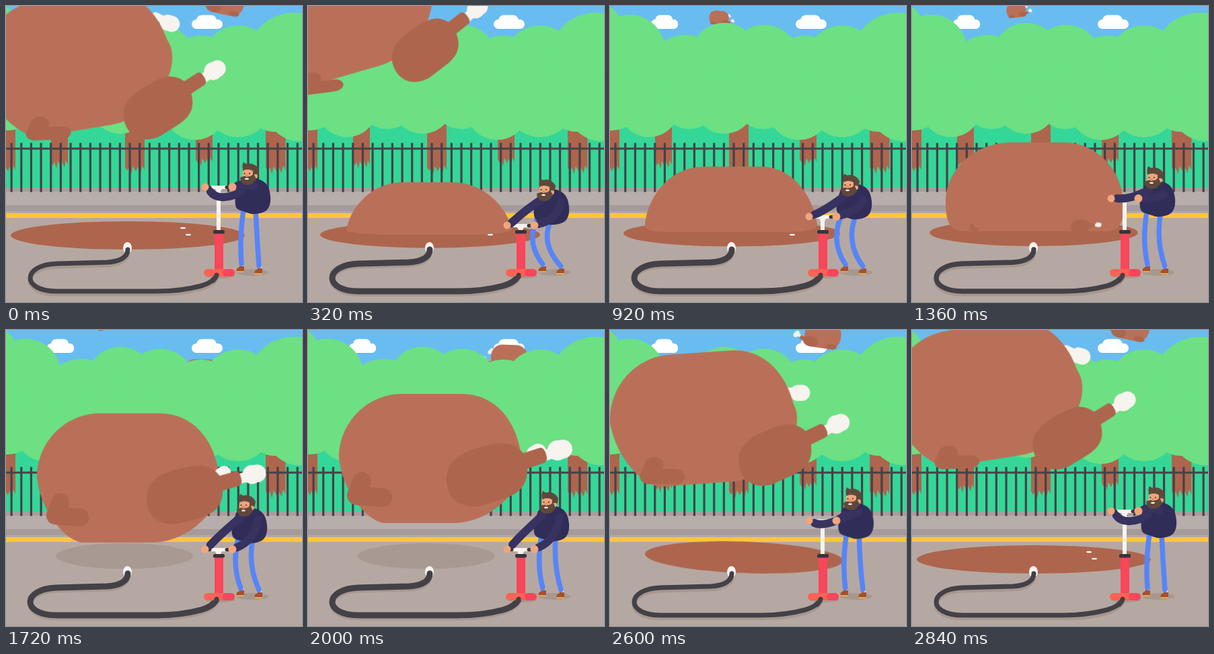
These frames come from a looping animation (440 by 440 pixels, 2.88 s). An HTML page without scripts:

```html
<!DOCTYPE html>
<html lang="en">
<head>
<meta charset="utf-8">
<title>Pumping up</title>
<style>
html, body { margin: 0; width: 100%; height: 100%; overflow: hidden; }
svg { display: block; width: 100vw; height: 100vh; background: #69bcf0; }
.a { animation: 2880ms linear infinite; }
.e { animation-timing-function: ease-in-out; }
.meat { fill: #ba7058; }
.dark { fill: #ae654d; }
.white { fill: #f7f3ef; }
.line { fill: none; stroke-linecap: round; stroke-linejoin: round; }

/* pump and man: up, down, two half-way poses, resting */
.handle { animation-name: handle; }
@keyframes handle {
  0%, 25%, 45.5%, 95%, to { transform: translateY(0); }
  10%, 13%, 35%, 37.5%, 52%, 64%, 81.5% { transform: translateY(57px); }
  31.94% { transform: translateY(44px); }
  47.22% { transform: translateY(17px); }
}
.torso { animation-name: torso; }
@keyframes torso {
  0%, 25%, 45.5%, 95%, to { transform: translate(0, 0); }
  10%, 13%, 35%, 37.5%, 52% { transform: translate(-5px, 16px); }
  31.94% { transform: translate(-4px, 8px); }
  47.22% { transform: translate(-2px, 4px); }
  64%, 81.5% { transform: translate(-5px, 5px); }
}
.head { animation-name: head; }
@keyframes head {
  0%, 25%, 45.5%, 95%, to { transform: translate(0, 0); }
  10%, 13%, 35%, 37.5%, 52% { transform: translate(-8px, 24px); }
  31.94% { transform: translate(-5px, 17px); }
  47.22% { transform: translate(-2px, 6px); }
  64%, 81.5% { transform: translate(-4px, 7px); }
}
.arm1 { animation-name: arm1; }
@keyframes arm1 {
  0%, 25%, 45.5%, 95%, to { d: path("M350 275C335 286 312 288 304 276"); }
  10%, 13%, 35%, 37.5%, 52% { d: path("M350 286C335 295 318 308 303 322"); }
  31.94% { d: path("M352 280C338 290 322 303 304 310"); }
  47.22% { d: path("M352 274C338 280 322 288 305 286"); }
  64%, 81.5% { d: path("M348 276C334 289 318 303 304 319"); }
}
.arm2 { animation-name: arm2; }
@keyframes arm2 {
  0%, 25%, 45.5%, 95%, to { d: path("M368 268C358 265 350 264 344 267"); }
  10%, 13%, 35%, 37.5%, 52% { d: path("M376 292C374 308 360 320 343 324"); }
  31.94% { d: path("M376 288C372 302 358 307 343 311"); }
  47.22% { d: path("M374 280C365 288 352 287 344 286"); }
  64%, 81.5% { d: path("M374 278C372 300 358 317 343 323"); }
}
.legs { animation-name: legs; }
@keyframes legs {
  0%, 25%, 45.5%, 95%, to { d: path("M353 303Q347 345 350 383M371 302Q373 345 376 386"); }
  10%, 13%, 35%, 37.5%, 52% { d: path("M340 318Q324 352 349 384M362 317Q344 352 376 387"); }
  31.94% { d: path("M343 313Q328 352 350 384M365 312Q350 352 376 387"); }
  47.22% { d: path("M349 306Q342 348 350 384M370 305Q362 348 376 387"); }
  64%, 81.5% { d: path("M346 311Q340 350 349 384M368 310Q365 350 376 386"); }
}
.hose { animation-name: hose; }
@keyframes hose {
  0%, 25%, 45%, 80%, to { stroke-width: 7px; }
  10%, 13%, 32%, 36%, 52%, 69% { stroke-width: 9px; }
}

/* empty skin: thrown in, flattened, then pulled under the dome */
.skin { animation-name: skin; transform-box: fill-box; transform-origin: center; }
@keyframes skin {
  0%, 92%, to { cx: 181px; cy: 341px; rx: 174px; ry: 21px; transform: rotate(0deg); opacity: 1; }
  10.5%, 26% { cx: 181.5px; cy: 340px; rx: 163.5px; ry: 19.5px; }
  31.94% { cx: 181px; cy: 338px; rx: 161px; ry: 19.5px; }
  47.22% { cx: 181px; cy: 337px; rx: 155px; ry: 20px; opacity: 1; transform: rotate(0deg); }
  55% { cx: 178px; cy: 336px; rx: 100px; ry: 14px; opacity: 1; transform: rotate(0deg); }
  55.01% { opacity: 0; }
  75% { cx: 505px; cy: 270px; rx: 56px; ry: 35px; opacity: 0; transform: rotate(65deg); }
  75.01% { opacity: 1; }
  80.56% { cx: 372px; cy: 318px; rx: 60px; ry: 33px; opacity: 1; transform: rotate(34deg); }
  87% { cx: 235px; cy: 332px; rx: 95px; ry: 28px; transform: rotate(6deg); }
}
.skinShade { animation-name: skinShade; }
@keyframes skinShade {
  0%, 74.9% { cx: 500px; opacity: 0; }
  75% { cx: 500px; opacity: 1; }
  80.56% { cx: 390px; opacity: 1; }
  88% { cx: 220px; opacity: 1; }
  88.1%, to { cx: 220px; opacity: 0; }
}
.shade { animation-name: shade; }
@keyframes shade {
  0%, 53% { opacity: 0; transform: translate(6px, -1px); }
  56%, 88% { opacity: 1; }
  69.44% { transform: translate(6px, -1px); }
  80.56% { transform: none; }
  91%, to { opacity: 0; transform: none; }
}
.dome { animation-name: dome; }
@keyframes dome {
  0% { opacity: 1; transform: none; d: path("M70 338C70 338 100 338 140 338L220 338C260 338 290 338 290 338C290 338 270 338 240 338L120 338C90 338 70 338 70 338Z"); }
  10.5%, 26% { d: path("M57 333C62 300 95 262 140 262L215 262C262 262 297 300 303 333C303 337 270 340 240 340L120 340C90 340 57 337 57 333Z"); }
  31.94% { d: path("M52 327C55 285 88 239 140 239L225 239C272 239 303 285 308 325C308 335 280 336 250 336L110 336C80 336 52 337 52 327Z"); }
  36%, 45% { d: path("M51 300C52 252 92 213 147 213L225 213C274 213 311 255 313 303C313 328 304 335 280 335L85 335C58 335 51 325 51 300Z"); }
  47.22% { transform: none; d: path("M50 290C52 240 95 203 150 203L225 203C275 203 314 245 314 295C314 325 310 335 285 335L80 335C55 335 50 320 50 290Z"); }
  56% { transform: translateY(40px); d: path("M46 190C46 138 88 95 140 95L228 95C279 95 308 135 316 180C335 222 279 287 217 287L115 287C92 287 52 245 46 190Z"); }
  69.44% { opacity: 1; transform: none; d: path("M46 190C46 138 88 95 140 95L228 95C279 95 308 135 316 180C335 222 279 287 217 287L115 287C92 287 52 245 46 190Z"); }
  69.45%, to { opacity: 0; }
}
.spots { animation-name: spots; }
@keyframes spots { 0%, 46% { opacity: 1; } 46.01%, 91% { opacity: 0; } 92%, to { opacity: 1; } }
.spot { animation-name: spot; }
@keyframes spot { 0%, 6% { opacity: 1; } 6.1%, 91% { opacity: 0; } 92%, to { opacity: 1; } }

/* the bird swells, lifts off and leaves over the top during the next round */
.body { animation-name: body; transform-origin: 184px 190px; }
@keyframes body {
  0% { opacity: 1; transform: translate(-78px, -107px) rotate(-9.5deg) scale(1.04); }
  11.11% { transform: translate(-139px, -188px) rotate(-16deg) scale(1.04); }
  26% { opacity: 1; transform: translate(-260px, -400px) rotate(-22deg) scale(1.04); }
  26.01%, 69.43% { opacity: 0; transform: none; }
  69.44% { opacity: 1; transform: none; }
  80.56% { opacity: 1; transform: translate(-11px, -16px) rotate(2deg) scale(.985); }
  98.61% { transform: translate(-72px, -98px) rotate(-9deg) scale(1.04); }
  to { opacity: 1; transform: translate(-78px, -107px) rotate(-9.5deg) scale(1.04); }
}
.drum { animation-name: drum; transform-origin: 262px 208px; }
@keyframes drum {
  0% { opacity: 1; transform: translate(-41px, -61px) rotate(-15deg) scale(.89); }
  11.11% { transform: translate(-93px, -146px) rotate(-20deg) scale(.87); }
  26% { opacity: 1; transform: translate(-200px, -350px) rotate(-25deg) scale(.87); }
  26.01%, 45.5% { opacity: 0; transform: translate(0, 128px) rotate(14deg) scale(.1); }
  45.51% { opacity: 1; }
  47.22% { transform: translate(-12px, 118px) rotate(14deg) scale(.23); }
  56% { transform: translate(0, 42px) rotate(3deg) scale(.92); }
  69.44% { transform: translate(0, 0) rotate(0deg) scale(1); }
  80.56% { transform: translate(-4px, 0) rotate(0deg) scale(.95); }
  98.61% { transform: translate(-36px, -52px) rotate(-14deg) scale(.89); }
  to { opacity: 1; transform: translate(-41px, -61px) rotate(-15deg) scale(.89); }
}
.wing { animation-name: wing; transform-origin: 91px 238px; }
@keyframes wing {
  0% { opacity: 1; transform: translate(-29px, -55px) rotate(-5deg) scale(1, .7); }
  11.11% { transform: translate(-73px, -123px) rotate(-10deg) scale(1, .65); }
  26% { opacity: 1; transform: translate(-190px, -330px) rotate(-16deg) scale(1, .65); }
  26.01%, 45.5% { opacity: 0; transform: translate(1px, 94px) rotate(0deg) scale(.08); }
  45.51% { opacity: 1; }
  47.22% { transform: translate(1px, 92px) rotate(0deg) scale(.2); }
  56% { transform: translate(0, 42px) rotate(0deg) scale(.92); }
  69.44% { transform: translate(0, 0) rotate(0deg) scale(1); }
  80.56% { transform: translate(-1px, -4px) rotate(0deg) scale(1, .95); }
  98.61% { transform: translate(-25px, -48px) rotate(-5deg) scale(1, .7); }
  to { opacity: 1; transform: translate(-29px, -55px) rotate(-5deg) scale(1, .7); }
}
.far { animation-name: far; transform-origin: 340px 176px; }
@keyframes far {
  0% { opacity: 1; transform: translate(-97px, -150px) rotate(48deg); }
  11.11% { transform: translate(-165px, -255px) rotate(48deg); }
  20% { opacity: 1; transform: translate(-240px, -370px) rotate(48deg); }
  20.01%, 55.9% { opacity: 0; transform: translate(-40px, 60px) scale(.3); }
  56% { opacity: 1; transform: translate(-25px, 50px) rotate(0deg) scale(.8); }
  69.44% { transform: translate(-1px, 7px) rotate(0deg); }
  80.56% { transform: translate(-21px, -18px) rotate(8deg); }
  98.61% { transform: translate(-90px, -137px) rotate(47deg); }
  to { opacity: 1; transform: translate(-97px, -150px) rotate(48deg); }
}

/* distant birds */
.bird1 { animation-name: bird1; }
@keyframes bird1 {
  0% { transform: translate(178px, 44px) rotate(-6deg) scale(.54); }
  31.94% { transform: translate(162px, 18px) rotate(6deg) scale(.54); }
  47.22% { transform: translate(155px, 7px) rotate(-6deg) scale(.54); }
  68%, to { transform: translate(143px, -22px) rotate(-14deg) scale(.54); }
}
.bird2 { animation-name: bird2; }
@keyframes bird2 {
  0% { transform: translate(327px, -6px) rotate(12deg) scale(-1, 1); }
  14% { transform: translate(342px, -34px) rotate(16deg) scale(-1, 1); }
  14.01%, 50% { transform: translate(284px, 85px) rotate(0deg) scale(-1, 1); }
  69.44% { transform: translate(299px, 42px) rotate(2deg) scale(-1, 1); }
  80.56% { transform: translate(305px, 22px) rotate(4deg) scale(-1, 1); }
  98.61% { transform: translate(326px, -4px) rotate(12deg) scale(-1, 1); }
  to { transform: translate(327px, -6px) rotate(12deg) scale(-1, 1); }
}
</style>
</head>
<body>
<svg viewBox="0 0 440 440" preserveAspectRatio="none">
  <defs>
    <g id="cloud">
      <rect x="-23" y="-4" width="46" height="14" rx="7"/>
      <rect x="-16" y="-10.500" width="30" height="18" rx="8"/>
    </g>
    <g id="bird">
      <path class="line" stroke="#f7f3ef" stroke-width="4" d="M20-5L27-8M28 7L38 4"/>
      <g class="white"><circle cx="26" cy="-11" r="3"/><circle cx="29" cy="-8" r="3"/><circle cx="38" cy="2" r="3.500"/><circle cx="40" cy="5" r="3.500"/></g>
      <rect class="meat" x="-27" y="-20" width="54" height="39" rx="17"/>
      <path class="dark" d="M6 14C4 4 18 1 25 6L32 4L34 9L28 12C26 20 10 22 6 14Z"/>
      <ellipse class="dark" cx="-15" cy="15" rx="8" ry="4"/>
    </g>
    <path id="trunk" d="M0 150H25V236L22 229L20 240L16 231L14 238L10 230L8 242L5 232L3 237L0 232Z"/>
    <path id="pipe" d="M181 362C181 374 168 380 150 381L75 383C23 385 23 424 75 424H225C250 424 275 420 290 416Q308 411 314 399"/>
    <g id="shoe">
      <path fill="#fff" d="M347 383H353V389H347Z"/>
      <path fill="#a5502f" d="M347 386L354 387V395H343Q341 390 347 388Z"/>
      <path fill="#e3aa55" d="M342.500 394H354V396H343Z"/>
    </g>
  </defs>

  <g fill="#fff">
    <use href="#cloud" transform="translate(81 24) scale(.88 1)"/>
    <use href="#cloud" x="299" y="24"/>
  </g>
  <g class="a bird1"><use href="#bird"/></g>
  <g class="a bird2"><use href="#bird"/></g>

  <path fill="#34d797" d="M0 130H440V271H0Z"/>
  <g class="dark">
    <use href="#trunk" x="-11" y="8"/>
    <use href="#trunk" x="67"/>
    <use href="#trunk" transform="translate(177 8) scale(1.16 1)"/>
    <use href="#trunk" x="282" y="-4"/>
    <use href="#trunk" transform="translate(386 8) scale(1.18 1)"/>
  </g>
  <g fill="#6ce083">
    <path d="M0 75H440V155H0Z"/>
    <circle cx="-18" cy="30" r="34"/><circle cx="29" cy="66" r="53"/><circle cx="112" cy="100" r="57"/>
    <circle cx="170" cy="75" r="50"/><circle cx="229" cy="80" r="52"/><circle cx="290" cy="100" r="56"/>
    <circle cx="345" cy="82" r="53"/><circle cx="428" cy="80" r="70"/>
    <circle cx="3" cy="140" r="45"/><circle cx="58" cy="150" r="45"/><circle cx="118" cy="140" r="43"/>
    <circle cx="170" cy="145" r="45"/><circle cx="228" cy="140" r="43"/><circle cx="281" cy="152" r="47"/>
    <circle cx="345" cy="145" r="50"/><circle cx="400" cy="141" r="46"/><circle cx="436" cy="151" r="50"/>
  </g>

  <path fill="#b5a8a2" d="M0 270H440V440H0Z"/>
  <path fill="#a89e9d" d="M0 270H440V276H0Z"/>
  <path fill="#b7adab" d="M0 276H440V296H0Z"/>
  <path fill="#a59b9a" d="M0 296H440V305H0Z"/>
  <path fill="#fdc53c" d="M0 308H440V315H0Z"/>
  <g stroke="#454248">
    <path stroke-width="73" stroke-dasharray="3.2 11.46" d="M6.5 240H440"/>
    <path stroke-width="3" d="M0 212H440"/>
  </g>

  <ellipse class="a shade" cx="170" cy="337" rx="102" ry="19" fill="#a89a93"/>
  <ellipse class="a skinShade" cx="500" cy="357" rx="32" ry="5" fill="#a89a93"/>
  <ellipse class="a skin dark" cx="181" cy="341" rx="174" ry="21"/>
  <path class="a dome meat"/>
  <ellipse class="a spot" cx="263" cy="330" rx="4" ry="1.200" fill="#fff"/>
  <ellipse class="a spots" cx="271" cy="340" rx="4" ry="1.200" fill="#fff"/>

  <g class="a far white">
    <path class="line" stroke="#f7f3ef" stroke-width="11" d="M318 184L336 177"/>
    <circle cx="338" cy="177" r="12"/><circle cx="343" cy="174" r="12"/>
  </g>
  <path class="a body meat" d="M46 190C46 138 88 95 140 95L228 95C279 95 308 135 316 180C335 222 279 287 217 287L115 287C92 287 52 245 46 190Z"/>
  <g class="a drum">
    <path class="line" stroke="#f7f3ef" stroke-width="16" d="M345 189L368 181"/>
    <g class="white"><circle cx="371" cy="179" r="15"/><circle cx="379" cy="177" r="14"/></g>
    <path class="dark" d="M206 222C206 190 235 179 265 172C290 165 307 167 320 183L345 175Q352 174 355 189Q356 196 350 198L326 206C326 228 318 242 290 251L258 261C228 267 206 250 206 222Z"/>
  </g>
  <path class="a wing line" stroke="#ae654d" stroke-width="28" d="M80 225L72 246L111 249"/>

  <use href="#pipe" class="line" y="4" stroke="#a6988f" stroke-width="7"/>
  <ellipse cx="366" cy="396" rx="24" ry="5" fill="#a6988f"/>
  <ellipse cx="318" cy="401" rx="22" ry="4" fill="#a6988f"/>
  <ellipse class="white" cx="180.500" cy="359.500" rx="6.500" ry="8.500"/>
  <g class="a e hose line" stroke="#434147"><use href="#pipe"/></g>

  <use href="#shoe"/>
  <use href="#shoe" x="27" y="3"/>
  <path class="a e legs line" stroke="#5685f8" stroke-width="7.500"/>
  <path class="a e torso" fill="#302d59" d="M347 264Q360 254 374 257Q389 261 392 276Q396 295 387 304Q379 310 364 309L346 303Q339 300 341 284Z"/>
  <path class="a e arm2 line" stroke="#37325f" stroke-width="12"/>

  <g class="a e handle">
    <path fill="#f7f3ef" d="M302 267H328V272H321L319 276V336H313V276L311 272H302Z"/>
    <path class="line" stroke="#37353f" stroke-width="5" d="M299 269.500H303M328 269.500H332"/>
  </g>
  <path fill="#f8465a" d="M310 336H323V393H310Z"/>
  <rect x="308" y="333" width="17" height="5.500" rx="2" fill="#37353f"/>
  <rect x="294" y="391" width="46" height="11" rx="5.500" fill="#fb6354"/>
  <rect x="322" y="391" width="18" height="11" rx="5.500" fill="#f8465a"/>
  <path class="line" stroke="#434147" stroke-width="7" d="M308 408Q312 404 313 400"/>

  <path class="a e arm1 line" stroke="#37325f" stroke-width="12"/>
  <g class="a e handle" fill="#f0a67c">
    <circle cx="296" cy="269" r="5.500"/><circle cx="336.500" cy="269" r="6"/>
  </g>
  <g class="a e head">
    <path fill="#5f483b" d="M353 247Q350 238 353 232Q357 236 361 234Q371 234 376 243Q375 253 371 260H360Z"/>
    <path fill="#f0a67c" d="M352 245Q359 241 367 245V258H351Z"/>
    <circle cx="371" cy="253" r="3" fill="#f0a67c"/>
    <path fill="#5f483b" d="M348 255Q354 252 359 253Q365 254 368 249L371 255Q370 266 358 266Q348 265 348 255Z"/>
    <ellipse cx="358" cy="257" rx="3" ry="1.300" fill="#f7f3ef"/>
    <circle cx="358" cy="252" r="2.200" fill="#ee8a62"/>
    <g fill="#37302f"><circle cx="354.500" cy="249" r="1.100"/><circle cx="362" cy="249" r="1.100"/></g>
  </g>
</svg>
</body>
</html>
```
